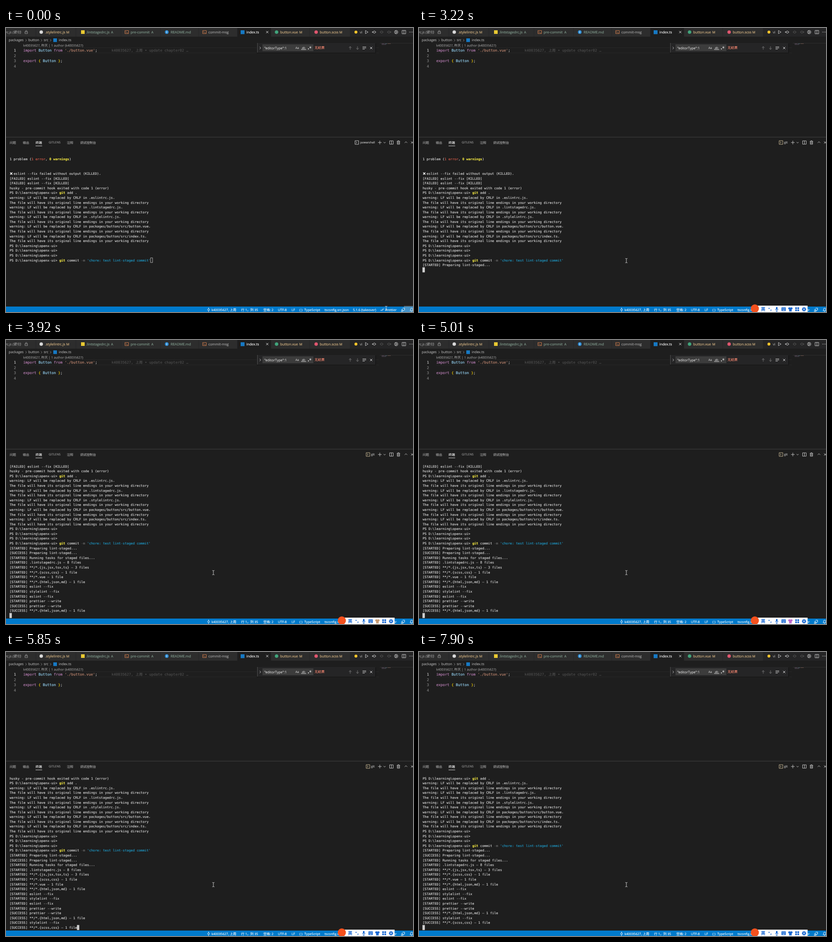
An HTML page for the animation above (8 s loop, 895 by 625 pixels).

```html
<!DOCTYPE html>
<html lang="en">
<head>
<meta charset="utf-8">
<title>Terminal commit</title>
<style>
html, body { margin: 0; width: 100%; height: 100%; overflow: hidden; background: #1e1e1e; }
svg { display: block; width: 895px; height: 625px; }
text { white-space: pre; text-rendering: geometricPrecision; stroke-width: .12px;
  font-family: "Open Sans", "Noto Sans CJK SC", "Noto Sans CJK", sans-serif; }
.mono { font-family: "DejaVu Sans Mono", "Noto Sans CJK SC", "Noto Sans CJK", monospace; }
.ln { fill: none; stroke-width: .9; }
#mouse { animation: move 8s infinite; }
#ime { animation: show 8s infinite; }
#corner { animation: hide 8s infinite step-end; }
#shell { animation: hideShell 8s infinite step-end; }
#git { animation: showGit 8s infinite step-end; }
#shirt { animation: tint 8s infinite linear; }
@keyframes move {
  0%, .875% { transform: translate(836px, 617px); animation-timing-function: ease-out; }
  6%, 100% { transform: translate(456px, 512px); }
}
@keyframes show { 0%, .875% { opacity: 0; } 5%, 100% { opacity: 1; } }
@keyframes hide { 0% { opacity: 1; } 1.75%, 100% { opacity: 0; } }
@keyframes hideShell { 0% { opacity: 1; } 23.75%, 100% { opacity: 0; } }
@keyframes showGit { 0% { opacity: 0; } 23.75%, 100% { opacity: 1; } }
@keyframes tint {
  0%, 42% { fill: #1767d2; }
  49% { fill: #c79a72; }
  56% { fill: #d98aa0; }
  62.6% { fill: #bd67cf; }
  71%, 100% { fill: #1767d2; }
}
</style>
</head>
<body>
<svg id="stage" viewBox="0 0 895 625"></svg>
<script>
const GREY = '#acacac', LIGHT = '#d4d4d4', WHITE = '#ffffff', GOLD = '#e0bd88', GREEN = '#85a292';
const USER = 'k40035627';
const esc = s => s.replace(/&/g, '&amp;').replace(/</g, '&lt;');

// y is the vertical middle of the capitals
const text = (x, y, s, fill = LIGHT, size = 7.2, more = '') =>
  `<text x="${x}" y="${y + size * .36}" fill="${fill}" stroke="${fill}" font-size="${size}" ${more}>${esc(s)}</text>`;
const spans = (x, y, size, parts) =>
  `<text class="mono" x="${x}" y="${y + size * .36}" font-size="${size}">` +
  parts.map(([s, fill, bold]) =>
    `<tspan fill="${fill}" stroke="${fill}"${bold ? ' font-weight="700"' : ''}>${esc(s)}</tspan>`).join('') + '</text>';
const rect = (x, y, w, h, fill, more = '') =>
  `<rect x="${x}" y="${y}" width="${w}" height="${h}" fill="${fill}" ${more}/>`;
const dot = (x, y, r, fill) => `<circle cx="${x}" cy="${y}" r="${r}" fill="${fill}"/>`;
const line = (x, y, d, color = LIGHT, more = '') =>
  `<path class="ln" transform="translate(${x} ${y})" d="${d}" stroke="${color}" ${more}/>`;

const CROSS = 'M-2.4-2.4L2.4 2.4M2.4-2.4L-2.4 2.4';
const RIGHT = 'M-1.3-2.5L1.3 0L-1.3 2.5';
const DOWN = 'M-2.2-1L0 1.2L2.2-1';
const RING = 'M2.4 0A2.4 2.4 0 1 1-2.4 0A2.4 2.4 0 1 1 2.4 0';
const SPLIT = 'M-4-3.7H4V3.7H-4ZM0-3.7V3.7';
const PROMPT = 'M-4-4H4V4H-4ZM-2-2L.3 0L-2 2';

function tabs() {
  const consoleIcon = x => line(x, 9, 'M-4-3.3H4V3.3H-4ZM-2.3-1.3L-.8 0L-2.3 1.3M.2 1.5H2.3', '#d9804f');
  let out = rect(0, 0, 895, 19, '#252526') + rect(0, 0, 757, 19, '#2d2d2d') + rect(509, 0, 74, 19, '#1e1e1e');
  for (const x of [66, 154, 253, 340, 424, 509, 583, 668, 757]) out += rect(x - .6, 0, .7, 19, '#252526');
  const label = (x, s, fill, mark, mx) =>
    text(x, 9, s, fill, 7.7) + (mark ? text(mx, 9, mark, fill, 7.4) : '');
  out += text(-1, 9, 'rc.js (索引)', '#a0a0a0', 7.5, 'font-style="italic"')
    + line(44.5, 9, 'M-2.8-.5H2.8V3.3H-2.8ZM-1.7-.5V-2A1.7 1.7 0 0 1 1.7-2V-.5', '#a0a0a0')
    + dot(77.5, 9, 3.8, '#d8d8d8') + label(86, '.stylelintrc.js', GOLD, 'M', 132.5)
    + rect(165, 5, 8, 8, '#e8c832') + label(176, '.lintstagedrc.js', GREEN, 'A', 231)
    + consoleIcon(265.5) + label(274, 'pre-commit', GREEN, 'A', 319.5)
    + dot(353.5, 9, 4, '#2f8fd8') + text(352.6, 9, 'i', WHITE, 6, 'font-weight="700"')
    + label(362, 'README.md', GREEN)
    + consoleIcon(436.5) + label(445, 'commit-msg', '#a8a8a8')
    + rect(516, 5, 8.5, 8.5, '#1679c4') + label(528.5, 'index.ts', WHITE) + line(574.5, 9, CROSS, WHITE)
    + dot(595, 9, 3.8, '#41a57c') + label(603, 'button.vue', GOLD, 'M', 645)
    + dot(682, 9, 3.8, '#e0566f') + label(690, 'button.scss', GOLD, 'M', 733)
    + dot(769.5, 9, 3.2, '#fbc52b') + label(778, 'vi', '#a0a0a0');
  const gitStep = (x, color, d) => line(x, 9, RING + d, color);
  out += line(793, 9, 'M-2.6-3.5L3.2 0L-2.6 3.5Z')
    + gitStep(810, LIGHT, 'M-2.4 0H-5M-3.4-1.6L-5 0L-3.4 1.6M2.4 0H4')
    + gitStep(826, '#5a5a5a', 'M-2.4 0H-4M2.4 0H4')
    + gitStep(842, '#5a5a5a', 'M-4 0H-2.4M2.4 0H5M3.4-1.6L5 0L3.4 1.6')
    + line(858, 9, 'M3.8 0A3.8 3.8 0 1 1-3.8 0A3.8 3.8 0 1 1 3.8 0M-.8-3.5V3.5M-.8-2L2.2 0L-.8 2')
    + line(875, 9, SPLIT);
  for (const x of [887.5, 890.5, 893.5]) out += dot(x, 9, .7, LIGHT);
  return out;
}

function editor() {
  const S = 7.96, KEY = '#c586c0', NAME = '#9cdcfe', BRACE = '#ffd700', PLAIN = '#d4d4d4';
  let out = text(6, 26.7, 'packages', GREY, 7.6) + line(44, 27, RIGHT, '#8a8a8a')
    + text(49, 26.7, 'button', GREY, 7.6) + line(78, 27, RIGHT, '#8a8a8a')
    + text(83, 26.7, 'src', GREY, 7.6) + line(98, 27, RIGHT, '#8a8a8a')
    + rect(104, 22.8, 8, 8, '#1679c4') + text(116, 26.7, 'index.ts', GREY, 7.6)
    + rect(38, 43, 782, .9, '#292929') + rect(38, 54.4, 782, .9, '#292929')
    + text(38, 38.8, `${USER}, 昨天 | 1 author (${USER})`, '#999999', 7.08);
  for (let i = 0; i < 4; i++)
    out += spans(17.2, 49 + i * 11.8, S, [[String(i + 1), i ? '#858585' : '#d0d0d0']]);
  out += spans(38, 49, S, [['import', KEY], [' Button ', NAME], ['from', KEY], [" './button.vue'", '#ce9178'], [';', PLAIN]])
    + spans(232, 49, S, [[`${USER}, 上周 • update chapter02 …`, '#505050']])
    + spans(38, 72.6, S, [['export', KEY], [' {', BRACE], [' Button ', NAME], ['}', BRACE], [';', PLAIN]]);
  out += rect(822, 33, 73, .9, '#303030')
    + rect(826, 34, 6, .8, '#705b70') + rect(833, 34, 5, .8, '#5c7480') + rect(839, 34, 7, .8, '#7a5c50')
    + rect(826, 36, 10, .8, '#5f5666');
  return out;
}

function finder() {
  return rect(551, 34, 263, 22, '#000', 'opacity=".25"') + rect(552, 33, 260, 21, '#252526') + rect(552, 33, 1.5, 21, '#454545')
    + rect(564, 36, 112, 15, '#3c3c3c') + line(559, 44, RIGHT)
    + text(568, 43.8, '"editorType":1', '#d8d8d8', 7.5)
    + text(636.5, 43.8, 'Aa', LIGHT, 6.5) + text(650.5, 43.3, 'ab', LIGHT, 6.5)
    + line(654.5, 47.5, 'M-5-1V0H5V-1') + rect(664, 45, 2, 2, LIGHT)
    + line(669.3, 42.7, 'M0-2.4V2.4M-2.1-1.2L2.1 1.2M2.1-1.2L-2.1 1.2')
    + text(678.5, 43.8, '无结果', '#f48771', 7.4)
    + line(757, 44, 'M0 3.5V-3.2M-2.8-.4L0-3.2L2.8-.4', '#858585')
    + line(773, 44, 'M0-3.5V3.2M-2.8.4L0 3.2L2.8.4', '#858585')
    + line(788, 44, 'M-4-2.5H4M-4 0H4M-4 2.5H1') + line(803, 44, CROSS, WHITE);
}

function panel() {
  let out = rect(0, 239.7, 895, .9, '#474747');
  for (const [x, s] of [[8, '问题'], [37, '输出'], [65, '终端'], [134, '注释'], [163, '调试控制台']])
    out += text(x, 252, s, x === 65 ? '#efefef' : '#a0a0a0', 7);
  return out + text(94, 252, 'GITLENS', '#a0a0a0', 6.6) + rect(65, 259, 14.5, .9, '#e7e7e7')
    + `<g id="shell">${line(771.5, 252, PROMPT)}${text(779, 251.6, 'powershell', LIGHT, 6.3)}</g>`
    + `<g id="git">${line(796, 252, PROMPT, '#d9c7a0')}${text(803, 251.6, 'git', LIGHT, 6.5)}</g>`
    + line(822, 252, 'M-4 0H4M0-4V4') + line(832.5, 252, DOWN) + line(847.5, 252, SPLIT)
    + line(863, 252, 'M-3.5-2.6H3.5M-1.2-2.6V-3.8H1.2V-2.6M-2.6-2.6V3.8H2.6V-2.6M-.9-1V2.4M.9-1V2.4')
    + line(879.5, 251.5, 'M-2.8 1.4L0-1.4L2.8 1.4') + line(893, 252, CROSS);
}

function statusBar() {
  let out = rect(0, 613, 895, 12, '#007acc');
  const items = [[452, USER + ', 上周'], [517, '行 1，列 35'], [566, '空格: 2'], [598, 'UTF-8'], [628, 'LF'],
    [645, '{ }'], [656, 'TypeScript'], [700.5, 'tsconfig.src.json'], [763, '5.1.6 (takeover)'], [834, 'Prettier']];
  for (const [x, s] of items) out += text(x, 620, s, WHITE, 7.15);
  return out + line(445.5, 620, 'M0-4.5V-2M0 2V4.5M2 0A2 2 0 1 1-2 0A2 2 0 1 1 2 0', WHITE)
    + line(827, 620, 'M-3.5.4L-2 2.2L2-2.4M-.2 1.8L.2 2.2L4.2-2.4', WHITE)
    + line(873, 620, 'M-1-3.5H3.6V.8H2L.5 2.4V.8M-1.8-1.4A1.2 1.2 0 1 1-1.9-1.4M-4 3.8Q-4 1.4-1.8 1.4T.2 3.8Z', WHITE)
    + line(892, 620, 'M-3.5 2.3H3.5L2.5.8V-1A2.5 2.5 0 0 0-2.5-1V.8ZM-.9 3.5H.9', WHITE)
    + rect(875, 611.5, 20, 13.5, '#c4c4c4', 'id="corner" fill-opacity=".35"');
}

function imeBar() {
  const BLUE = '#1767d2';
  let out = rect(738, 611, 116.5, 14, WHITE) + dot(738.5, 617.3, 9, '#f4511e')
    + text(752, 618.8, '英', BLUE, 9.6, 'font-weight="700"')
    + dot(769.8, 617, 1.2, BLUE) + line(774, 620.5, 'M0-1Q.8.4-.6 2', BLUE, 'style="stroke-width:1.5"')
    + rect(785, 613.8, 3.4, 6.2, BLUE, 'rx="1.7"') + line(786.7, 619.5, 'M-3.2-1.2Q-3 2.1 0 2.1T3.2-1.2M0 2V4.4M-2 4.4H2', BLUE)
    + rect(797, 614.8, 9.6, 8, BLUE, 'rx="1"');
  for (let i = 0; i < 6; i++) out += rect(798.5 + i % 3 * 2.6, 616.3 + (i / 3 | 0) * 2, 1.3, 1, WHITE);
  out += rect(799.5, 620.7, 4.6, .9, WHITE)
    + '<path id="shirt" transform="translate(816.7 619)" d="M-5-3L-2-4.5Q0-2.8 2-4.5L5-3L4.2.2L2.9-.4V4.6H-2.9V-.4L-4.2.2Z"/>';
  for (let i = 0; i < 4; i++) out += rect(827.3 + i % 2 * 4.8, 614.8 + (i >> 1) * 4.6, 3.8, 3.7, BLUE, 'rx=".8"');
  for (let a = 0; a < 180; a += 45) out += rect(845.7, 614.3, 2, 9.4, BLUE, `transform="rotate(${a} 846.7 619)"`);
  return `<g id="ime">${out}${dot(846.7, 619, 3.5, BLUE)}${dot(846.7, 619, 1.4, WHITE)}</g>`;
}

// Terminal
const FG = '#e2e2e2', YELLOW = '#f5e943', SIZE = 7.25, COL = SIZE * .602, ROW = 10.59, TOP = 278, LAST = 31;
const PS = 'PS D:\\learning\\openx-ui> ';
const started = s => '[STARTED] ' + s, success = s => '[SUCCESS] ' + s;
const globs = { html: '**/*.{html,json,md} — 1 file', scss: '**/*.{scss,css} — 1 file' };
const warned = ['.eslintrc.js', '.lintstagedrc.js', '.stylelintrc.js', 'packages/button/src/button.vue', 'packages/button/src/index.ts'];
const log = [
  '',
  [['1 problem (', FG], ['1 error', '#e5604d'], [', ', FG], ['0 warnings', YELLOW, 1], [')', FG]],
  '', '',
  '  eslint --fix failed without output (KILLED).',
  '[FAILED] eslint --fix [KILLED]', '[FAILED] eslint --fix [KILLED]',
  'husky - pre-commit hook exited with code 1 (error)',
  [[PS, FG], ['git', YELLOW, 1], [' add .', FG]],
  ...warned.flatMap(f => [`warning: LF will be replaced by CRLF in ${f}.`,
    'The file will have its original line endings in your working directory']),
  PS, PS, PS,
  [[PS, FG], ['git', YELLOW, 1], [' commit ', FG], ['-m ', '#767676'], ["'chore: test lint-staged commit'", '#1fa3d4']],
  ...['Preparing lint-staged...'].flatMap(s => [started(s), success(s)]),
  ...['Running tasks for staged files...', '.lintstagedrc.js — 8 files', '**/*.{js,jsx,tsx,ts} — 3 files', globs.scss,
    '**/*.vue — 1 file', globs.html, 'eslint --fix', 'stylelint --fix', 'eslint --fix', 'prettier --write'].map(started),
  ...['prettier --write', globs.html, 'stylelint --fix', globs.scss].map(success)
];

// [time, printed lines, cursor line, cursor column]
const steps = [[0, 23, 22, 71], [620, 23, 23, 0], [3220, 24, 24, 0], [3350, 26, 26, 0],
  [3420, 35, 35, 0], [3850, 37, 37, 0], [5850, 39, 38, 34], [5920, 39, 39, 0]];

function terminal() {
  const rows = log.map((l, i) => spans(8, TOP + i * ROW, SIZE, Array.isArray(l) ? l : [[l, FG]])).join('');
  return `<clipPath id="view"><rect y="272" width="895" height="341"/></clipPath><g clip-path="url(#view)"><g id="log">`
    + rows + line(11.6, TOP + 4 * ROW, CROSS, WHITE, 'style="stroke-width:1.6"')
    + `<rect id="cursor" width="${COL}" height="10.2" stroke="#d0d0d0" stroke-width=".8"/></g></g>`;
}

const stage = document.getElementById('stage');
stage.innerHTML = rect(0, 0, 895, 625, '#1e1e1e') + tabs() + editor() + finder() + panel() + terminal() + statusBar() + imeBar()
  + `<g id="mouse">${line(0, 0, 'M-2.4-4.8Q0-4.8 0-3.8Q0-4.8 2.4-4.8M0-4V4M-2.4 4.8Q0 4.8 0 3.8Q0 4.8 2.4 4.8', '#e0e0e0')}</g>`;

const scroller = document.getElementById('log');
const rows = [...scroller.querySelectorAll('text')];
const cursor = document.getElementById('cursor');
let start;

function draw(now) {
  start ??= now;
  const t = (now - start) % 8000;
  const [, count, row, col] = steps.findLast(s => s[0] <= t);
  rows.forEach((r, i) => r.style.display = i < count ? '' : 'none');
  scroller.setAttribute('transform', `translate(0 ${-Math.max(0, row - LAST) * ROW})`);
  cursor.setAttribute('x', 8 + col * COL);
  cursor.setAttribute('y', TOP + row * ROW - 5.1);
  cursor.setAttribute('fill', t < 410 ? 'none' : '#d0d0d0');
  requestAnimationFrame(draw);
}
requestAnimationFrame(draw);
</script>
</body>
</html>
```
